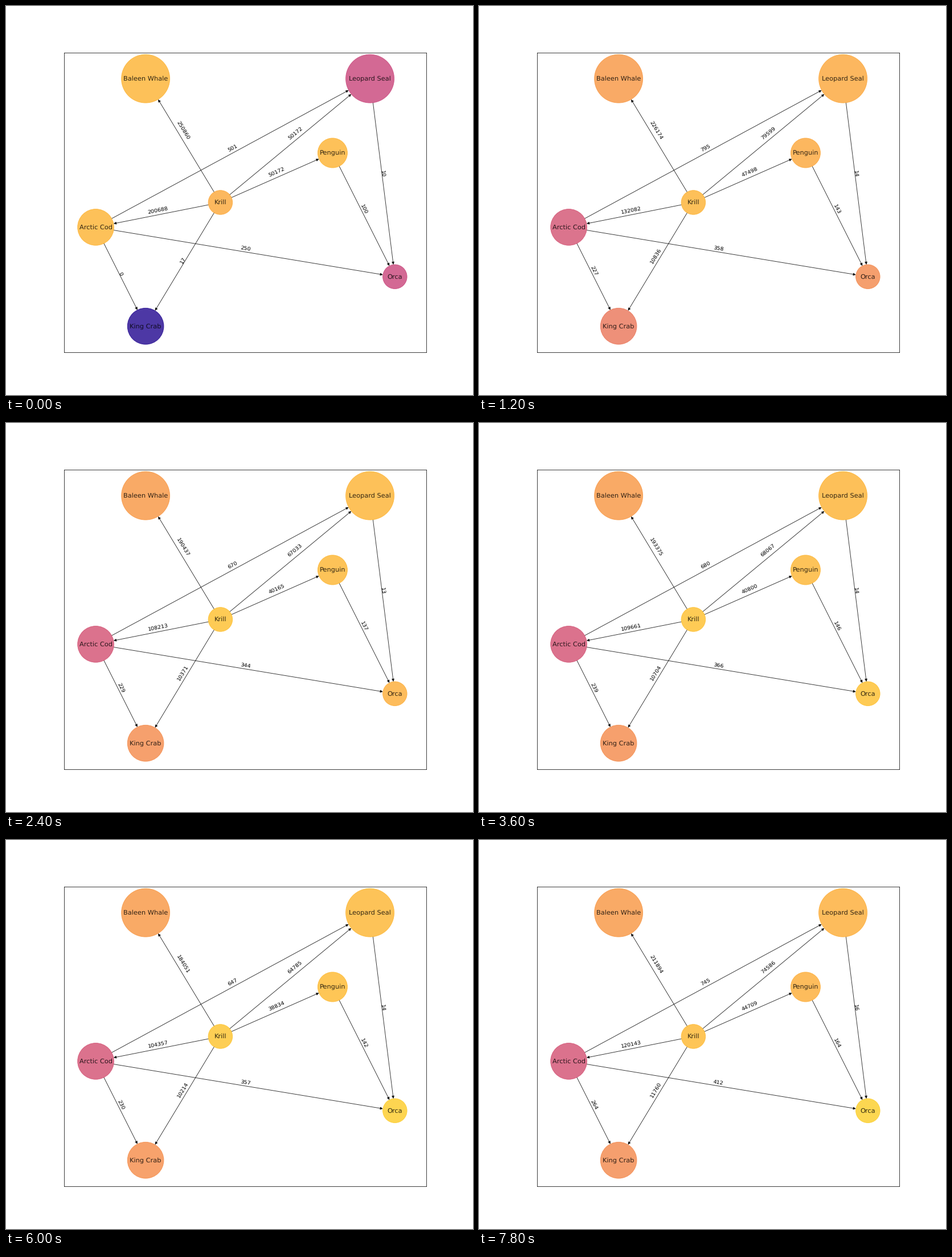
A matplotlib script for the animation above (8000 ms loop, 820x683 px).

```python
import numpy as np
import matplotlib.pyplot as plt
from matplotlib.animation import FuncAnimation
from matplotlib.patches import FancyArrowPatch

plt.rcParams["text.hinting"] = "none"
plt.rcParams["font.family"] = "DejaVu Sans"

W, H = 820, 683
DPI = 64
PT = W / 12 / DPI          # point scale of a 12 inch wide figure
ALPHA = 0.8
FRAMES, INTERVAL, HOLD = 40, 200, 3

# Krill eaten by whales at a few steps; every other number follows from it
CATCH = {0: 250860, 1: 263381, 3: 188968, 6: 193375, 8: 273233,
         10: 184051, 13: 211894}

# name: ((x, y), marker area, (first shade, settled shade, decay), swing)
NODES = {
    "Krill": ((10, 5), 2000, (.80, .80, 0), .26),
    "Arctic Cod": ((0, 4), 4500, (.83, .53, .1), 0),
    "Penguin": ((19, 7), 3000, (.83, .765, .05), .3),
    "Leopard Seal": ((22, 10), 8000, (.49, .77, .03), .25),
    "Baleen Whale": ((4, 10), 8000, (.83, .75, .05), 0),
    "King Crab": ((4, 0), 4500, (.03, .69, .28), .12),
    "Orca": ((24, 2), 2000, (.49, .9, .68), 0),
}

# Share of the whale catch along each edge: first, settled, decay
SHARES = {
    ("Krill", "Baleen Whale"): (1, 1, 0),
    ("Krill", "Leopard Seal"): (.2, .352, .02),
    ("Krill", "Penguin"): (.2, .211, .3),
    ("Krill", "Arctic Cod"): (.8, .567, .27),
    ("Krill", "King Crab"): (7e-5, .0555, .37),
    ("Arctic Cod", "King Crab"): (0, .00125, .44),
    ("Arctic Cod", "Orca"): (.001, .00195, .62),
}


def settle(first, last, decay, step):
    rest = decay ** step
    return first * rest + last * (1 - rest)


def catch_at(step):
    return np.interp(step, list(CATCH), list(CATCH.values()))


def shades_at(step):
    drop = 1 - catch_at(step) / CATCH[0]
    return np.array([settle(*shade, step) + swing * drop
                     for _, _, shade, swing in NODES.values()])


def counts_at(step):
    catch = catch_at(step)
    counts = {e: int(catch * settle(*s, step)) for e, s in SHARES.items()}
    orca = counts["Arctic Cod", "Orca"]
    counts["Arctic Cod", "Leopard Seal"] = counts["Krill", "Leopard Seal"] // 100
    counts["Penguin", "Orca"] = orca * 2 // 5
    counts["Leopard Seal", "Orca"] = orca // 25
    return counts


fig = plt.figure(figsize=(W / DPI, H / DPI), dpi=DPI, facecolor="white")
ax = fig.add_axes([0.1249, 0.11, 0.7751, 0.77])
ax.set(xticks=[], yticks=[],
       xlim=(12 - 12 * 1.21, 12 + 12 * 1.21),
       ylim=(5 - 5 * 1.21, 5 + 5 * 1.21))
for spine in ax.spines.values():
    spine.set_linewidth(0.8 * PT)

points = np.array([node[0] for node in NODES.values()])
areas = np.array([node[1] for node in NODES.values()])
dots = ax.scatter(*points.T, s=areas * PT ** 2, c=shades_at(0), cmap="plasma",
                  vmin=0, vmax=1, alpha=ALPHA, linewidths=PT, zorder=2)
for name, (x, y) in zip(NODES, points):
    ax.text(x, y, name, size=12 * PT, alpha=ALPHA, ha="center", va="center",
            zorder=4)


def radius(name):
    return np.sqrt(NODES[name][1]) / 2 * PT


def add_edge(src, dst):
    a, b = np.array(NODES[src][0]), np.array(NODES[dst][0])
    ax.add_patch(FancyArrowPatch(
        a, b, arrowstyle="-|>", mutation_scale=10 * PT, linewidth=PT,
        color="black", alpha=ALPHA, shrinkA=radius(src), shrinkB=radius(dst),
        zorder=1))
    dx, dy = ax.transData.transform(b) - ax.transData.transform(a)
    angle = (np.degrees(np.arctan2(dy, dx)) + 90) % 180 - 90
    return ax.text(*(a + b) / 2, "", size=10 * PT, rotation=angle,
                   ha="center", va="bottom", zorder=3)


labels = {edge: add_edge(*edge) for edge in counts_at(0)}


def update(frame):
    step = frame // HOLD
    dots.set_array(shades_at(step))
    for edge, count in counts_at(step).items():
        labels[edge].set_text(str(count))
    return [dots, *labels.values()]


anim = FuncAnimation(fig, update, frames=FRAMES, interval=INTERVAL,
                     init_func=lambda: update(0), repeat=True,
                     repeat_delay=0, blit=False)
plt.show()
```
